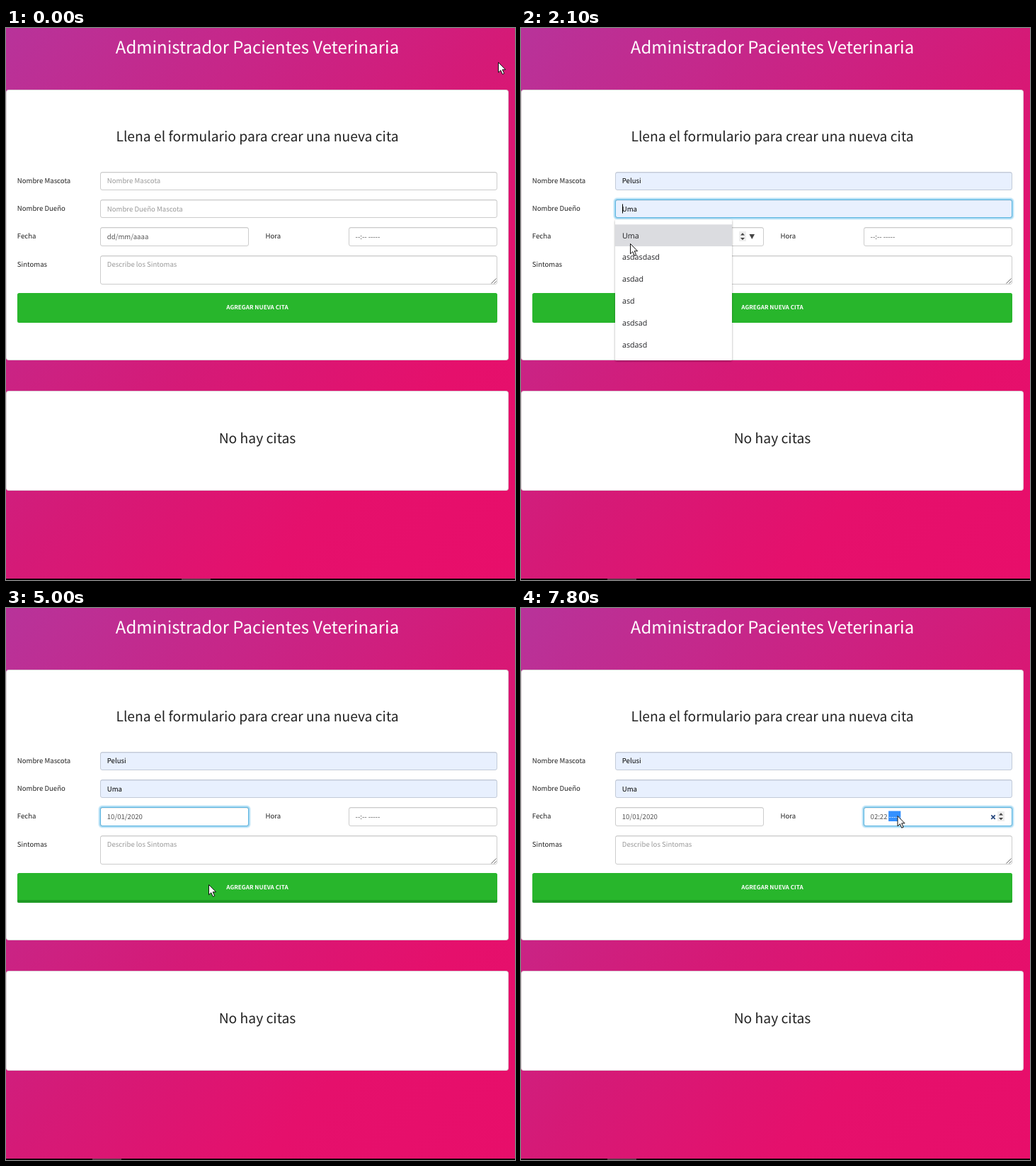
Animation of 719x779 px, one loop 8 s. Source, as an HTML page:

```html
<!DOCTYPE html>
<html lang="es">
<head>
<meta charset="utf-8">
<title>Citas</title>
<style>
  html, body { margin: 0; width: 100%; height: 100%; overflow: hidden; }
  svg { display: block; width: 100%; height: 100%; text-rendering: geometricPrecision; }
  text { font-family: 'Noto Sans CJK JP', 'Noto Sans CJK SC', 'Noto Sans CJK', 'Source Sans Pro', sans-serif; font-size: 9.6px; fill: #222; }
  .mid { text-anchor: middle; }
  .hint { fill: #999; }
  .value { fill: #555; }
  .filled { fill: #000; }
  .white { fill: #fff; }
  .menu { font: 500 10.7px 'Open Sans', 'Noto Sans', sans-serif; fill: #202124; }
  .cal { font: 9.4px 'Liberation Sans', Arial, sans-serif; fill: #000; }
  .dim { fill: #aaa; }
</style>
</head>
<body>
<svg viewBox="0 0 719 779" preserveAspectRatio="none">
  <defs>
    <linearGradient id="bg" x1="0" y1="0" x2="1" y2="1">
      <stop offset="0" stop-color="#b8339a"/>
      <stop offset=".5" stop-color="#d51a77"/>
      <stop offset=".75" stop-color="#e5106c"/>
      <stop offset="1" stop-color="#e80e6a"/>
    </linearGradient>
    <linearGradient id="key" x1="0" y1="0" x2="0" y2="1">
      <stop offset="0" stop-color="#f4f4f4"/>
      <stop offset="1" stop-color="#dcdcdc"/>
    </linearGradient>
    <filter id="shade" x="-10%" y="-10%" width="120%" height="120%">
      <feDropShadow dx="0" dy="1" stdDeviation="1.6" flood-opacity=".35"/>
    </filter>
  </defs>
  <g id="page"></g>
  <g id="live"></g>
</svg>
<script>
const LOOP = 8000, STEP = 100;
const PET = 'Pelusi', OWNER = 'Uma';
const BLUE = '#3390ff';
const page = document.getElementById('page');
const live = document.getElementById('live');

const clamp = v => Math.max(0, Math.min(1, v));
const rect = (x, y, w, h, fill, extra = '') =>
  `<rect x="${x}" y="${y}" width="${w}" height="${h}" fill="${fill}" ${extra}/>`;
const box = (x, y, w, h, fill, line, r = 0, extra = '') =>
  rect(x + .5, y + .5, w - 1, h - 1, fill, `stroke="${line}" rx="${r}" ${extra}`);
const path = (d, fill, extra = '') => `<path d="${d}" fill="${fill}" ${extra}/>`;
const text = (x, y, s, cls = '', size) =>
  `<text x="${x}" y="${y}" class="${cls}" ${size ? `style="font-size:${size}px"` : ''}>${s}</text>`;

// Widths of the characters in date and time values
const charWidth = c => ({ '-': 3.32, ':': 2.65, ' ': 2.1 })[c] || 5.3;
const width = s => [...s].reduce((sum, c) => sum + charWidth(c), 0);

const fields = {
  pet: [133, 203, 561, 26],
  owner: [133, 242, 561, 26],
  date: [133, 281, 210, 27],
  time: [484, 281, 210, 27],
  notes: [133, 321, 561, 41]
};
const inside = ([px, py], [x, y, w, h]) => px >= x && px < x + w && py >= y && py < y + h;

// Pointer: time, x, y
const track = [
  [0, 695, 48], [100, 680, 53], [300, 498, 108], [400, 357, 172], [500, 245, 212],
  [700, 225, 216], [900, 197, 239], [1000, 185, 248], [1100, 178, 249], [1400, 178, 249],
  [1700, 172, 256], [1900, 163, 272], [2100, 154, 304], [2200, 151, 320], [2300, 151, 324],
  [2400, 151, 324], [2600, 152, 306], [2800, 155, 302], [2900, 155, 302], [3000, 173, 299],
  [3300, 200, 298], [3600, 290, 290], [3800, 326, 292], [4100, 326, 292], [4300, 318, 312],
  [4500, 298, 362], [4700, 287, 387], [4800, 286, 390], [5000, 286, 390], [5200, 380, 350],
  [5400, 500, 299], [5800, 500, 299], [6000, 507, 296], [6800, 507, 296],
  [7300, 530, 294], [7500, 531, 294], [7600, 531.5, 293], [LOOP, 531.5, 293]
];
function pointerAt(t) {
  const i = track.findIndex(k => k[0] > t);
  const [t0, x0, y0] = track[i - 1], [t1, x1, y1] = track[i];
  const p = (t - t0) / (t1 - t0);
  return [x0 + (x1 - x0) * p, y0 + (y1 - y0) * p];
}

const focusAt = (t, on, off) => clamp((t - on) / 200) - clamp((t - off) / 300);

function field([x, y, w, h], focus = 0, filled = false) {
  const glow = focus ** 3;
  let s = '';
  for (const [d, a] of [[3, .2], [2, .35], [1, .45]])
    if (glow > 0) s += rect(x - d, y - d, w + 2 * d, h + 2 * d, '#7cc8ee', `rx="${3 + d}" opacity="${a * glow}"`);
  s += box(x, y, w, h, filled ? '#e8f0fe' : '#fff', filled ? '#c3cbd8' : '#ccc', 2.5);
  s += rect(x + 1, y + 1, w - 2, 1, '#000', 'opacity=".07"');
  if (focus > 0) s += box(x, y, w, h, 'none', '#5fb6e0', 2.5, `opacity="${focus}"`);
  return s;
}

function menu(y, items, hover) {
  const pitch = 30.8;
  let s = rect(133, y, 165, 14 + pitch * items.length, '#fff', 'rx="2" filter="url(#shade)"');
  items.forEach((item, i) => {
    const top = y + 7 + i * pitch;
    if (i === hover) s += rect(133, top, 165, pitch, '#dbdce0');
    s += text(143, top + 19.2, item, 'menu');
  });
  return s;
}

const caret = (x, y) => rect(x, y - 6.5, 1, 13, '#000');

const spinner = x => rect(x - 5, 287, 10, 14, '#eee') +
  path(`M${x - 3} 292.5l3 -3.2l3 3.2zM${x - 3} 296l3 3.2l3 -3.2z`, '#444');

function calendar() {
  let s = box(133, 309, 202, 140, '#fff', '#b0b0b0');
  s += text(145.5, 329, 'enero de 2020', 'cal', 9.2) + path('M209 324h6.5l-3.2 4z', '#000');
  for (const x of [265, 286, 308]) s += box(x, 317, 19, 18, 'url(#key)', '#b4b4b4', 1);
  s += path('M276 323v6l-3.5 -3zM316 323v6l3.5 -3z', '#444') + rect(293, 323.5, 5, 4, '#444', 'rx="1"');
  s += rect(142, 343, 185, 19, '#f1f1f1') + box(142, 343, 185, 98, 'none', '#5b95f0');
  s += box(221, 409, 26, 15, 'none', '#bbb');
  const colX = i => 155.2 + 26.3 * i;
  ['dom.', 'lun.', 'mar.', 'mié.', 'jue.', 'vie.', 'sáb.'].forEach((d, i) => {
    s += text(colX(i), 355.8, d, 'cal mid', 9.2);
  });
  for (let i = 0; i < 35; i++) {
    const day = new Date(2019, 11, 29 + i);
    const cls = day.getMonth() ? 'cal mid dim' : 'cal mid';
    s += text(colX(i % 7), 373.8 + 15.4 * Math.floor(i / 7), day.getDate(), day.getMonth() === 0 && day.getFullYear() === 2020 ? 'cal mid' : cls);
  }
  return s;
}

function timeValue(t) {
  const parts = [t < 6300 ? '--' : '02', ':', t < 7300 ? '--' : t < 7800 ? '02' : '22', ' ', '-----'];
  const active = t < 5700 ? -1 : t < 6300 ? 0 : t < 7800 ? 2 : 4;
  let x = 493.6, s = '';
  parts.forEach((p, i) => {
    if (i === active) s += rect(x - .4, 286.5, width(p) + .6, 14.5, BLUE);
    s += text(x, 297.5, p, i === active ? 'white' : 'value');
    x += width(p);
  });
  return s;
}

function pointer([x, y]) {
  const beam = inside([x, y], fields.pet) || inside([x, y], fields.owner);
  const shape = beam
    ? path('M-3 -8h2.5l.5 .5l.5 -.5h2.5M0 -7.5v15M-3 8h2.5l.5 -.5l.5 .5h2.5', 'none', 'stroke="#333"')
    : path('M.5 .5V14.8L3.8 11.7L6.3 17.3L8.7 16.2L6.2 10.8H10.6Z', '#fff', 'stroke="#111" stroke-width="1" stroke-linejoin="round"');
  return `<g transform="translate(${x} ${y})">${shape}</g>`;
}

function drawPage() {
  let s = rect(0, 0, 719, 779, 'url(#bg)');
  s += text(355, 36, 'Administrador Pacientes Veterinaria', 'mid white', 24);
  s += box(0, 87, 710, 382, '#fff', '#dcd3d8', 3) + box(0, 512, 710, 141, '#fff', '#dcd3d8', 3);
  s += text(355, 160.3, 'Llena el formulario para crear una nueva cita', 'mid', 19.3);
  s += text(355, 585.5, 'No hay citas', 'mid', 19.3);
  ['Nombre Mascota', 'Nombre Dueño', 'Fecha', 'Sintomas'].forEach((label, i) => {
    s += text(15.8, 218.6 + 39.4 * i, label);
  });
  page.innerHTML = s + text(366.5, 297.4, 'Hora');
}

function drawLive(t) {
  const pos = pointerAt(t);
  const petShown = t >= 1000, ownerShown = t >= 2000;
  const during = (a, b) => t >= a && t < b;
  let s = rect(0, 777, 719, 2, '#120409') + rect(t < 100 ? 248 : 122, 777, 41, 2, '#5a3b4a');

  s += rect(16, 374, 678, 42, '#28b62c', 'rx="2.5"');
  if (t >= 5000) s += path('M16 412h678v1.5q0 2.5 -2.5 2.5h-673q-2.5 0 -2.5 -2.5z', '#1f9a25');
  else if (t >= 3000) s += rect(130, 412, 171, 4, '#23a529');
  s += text(355, 396.8, 'AGREGAR NUEVA CITA', 'mid white', '8.2px;font-weight:700;--u:1');

  s += field(fields.pet, focusAt(t, 500, 1600), petShown);
  s += text(142.8, 219.4, petShown ? PET : 'Nombre Mascota', petShown ? 'filled' : 'hint');
  if (during(600, 1700)) s += caret(t < 1400 ? 143 : 171, 216);

  s += field(fields.owner, focusAt(t, 1600, 3800), ownerShown);
  const row = during(2200, 2600) ? 1 : 0;
  s += text(142.8, 258.8, ownerShown ? (row ? 'asdasdasd' : OWNER) : 'Nombre Dueño Mascota', ownerShown ? 'filled' : 'hint');
  if (during(1700, 3900)) s += caret(t < 3000 ? 143 : 163, 255);
  if (during(3000, 3900))
    s += path('M143 261' + 'l1.5 -1l1.5 1'.repeat(6), 'none', 'stroke="#e33" stroke-width=".9"');

  s += field(fields.date, focusAt(t, 3800, 5700));
  const picking = during(3900, 5000);
  if (picking) s += rect(143, 287, 12.5, 14, BLUE);
  s += text(142.8, 297.5, t >= 5000 ? '10/01/2020'
    : picking ? '<tspan fill="#fff">dd</tspan>/mm/aaaa' : 'dd/mm/aaaa', 'value');
  if (inside(pos, fields.date)) {
    if (pos[0] > 320) s += rect(320, 288, 12, 12, '#e4e4e4');
    s += spinner(313) + path('M322.5 291h7.5l-3.7 7z', '#444');
  }

  s += field(fields.time, focusAt(t, 5600, LOOP)) + timeValue(t);
  if (inside(pos, fields.time)) {
    s += spinner(678);
    if (t >= 6300) s += path('M664.3 292.3l5.4 5.6m0 -5.6l-5.4 5.6', 'none', 'stroke="#26477d" stroke-width="1.7"');
  }

  s += field(fields.notes) + text(142.8, 336.8, 'Describe los Sintomas', 'hint');
  s += path('M685.5 360.5l7 -7M689.5 360.5l3 -3', 'none', 'stroke="#666"');

  if (during(700, 1400)) s += menu(231, [PET, 'asdasd', 'asdada', 'sdsd', 'asdsd'], t < 1000 ? -1 : 0);
  if (during(1800, 3000))
    s += menu(270.3, [OWNER, 'asdasdasd', 'asdad', 'asd', 'asdsad', 'asdasd'], ownerShown ? row : -1);
  if (during(4000, 5000)) s += calendar();
  live.innerHTML = s + pointer(pos);
}

let shown = -1;
function tick(now) {
  const t = Math.floor((now % LOOP) / STEP) * STEP;
  if (t !== shown) drawLive(shown = t);
  requestAnimationFrame(tick);
}
drawPage();
drawLive(0);
requestAnimationFrame(tick);
</script>
</body>
</html>
```
